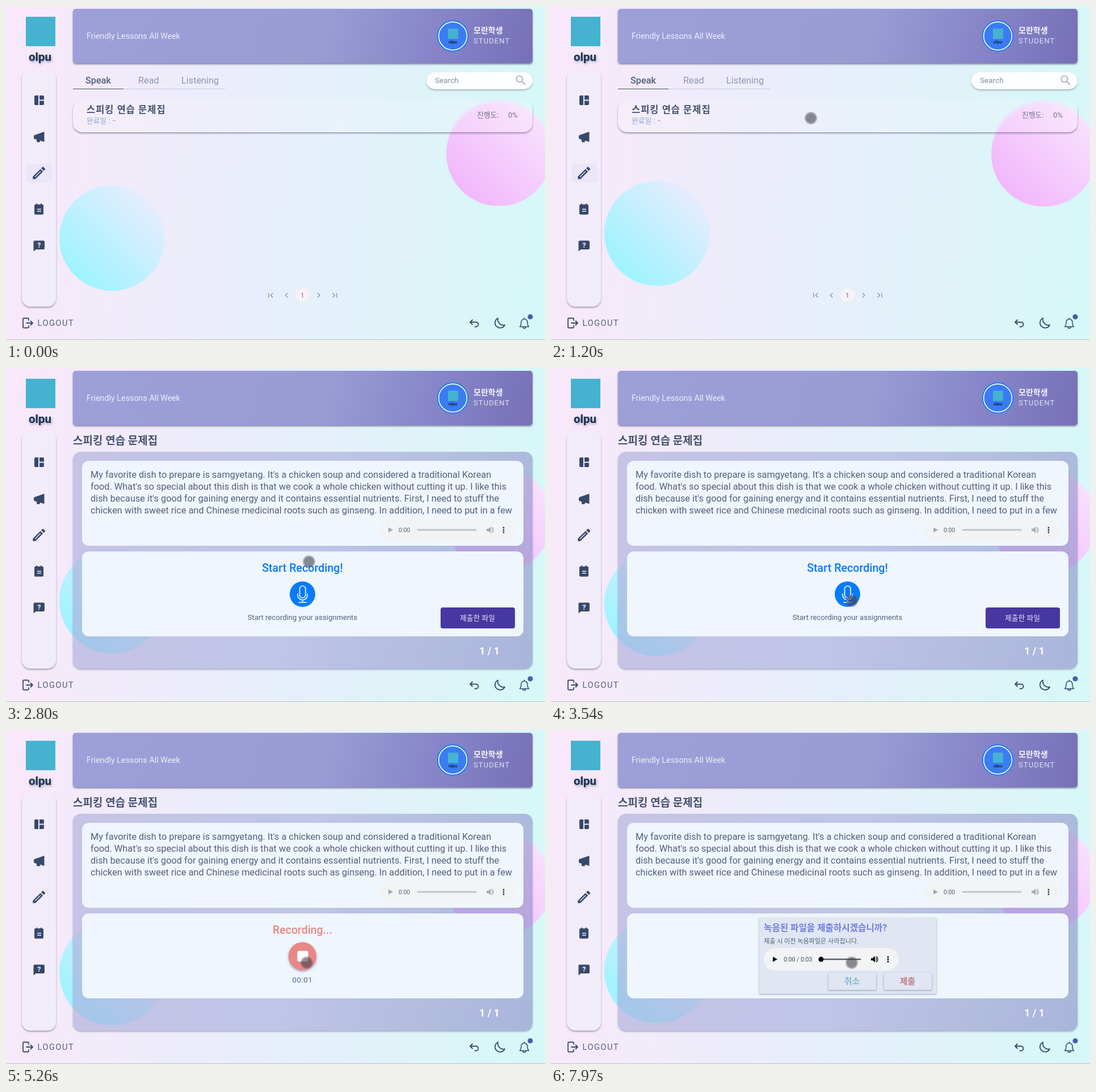
An HTML page for the animation above (8000 ms loop, 950 px wide and 590 px high).

```html
<!DOCTYPE html>
<html lang="ko">
<head>
<meta charset="utf-8">
<title>Speaking practice</title>
<style>
html, body { margin: 0; width: 100%; height: 100%; overflow: hidden; }
main {
  position: relative; width: 950px; height: 590px; overflow: hidden;
  background: linear-gradient(94deg, #f9e8fa 0%, #f1ebfa 22%, #e7effa 52%, #d6f8f8 100%);
  font-family: Roboto, "Noto Sans CJK KR", "Noto Sans CJK", sans-serif;
}
main::after { content: ""; position: absolute; left: 0; right: 0; bottom: 0; height: 1px; background: #bcbfcb; }
.layer, svg { position: absolute; inset: 0; width: 950px; height: 590px; }
.box { position: absolute; box-sizing: border-box; }

.blob { position: absolute; width: 186px; height: 186px; border-radius: 50%; top: -93px; }
.blue { left: 94px; background: linear-gradient(45deg, #9bf4ff 12%, #e9ecfe 88%); animation: blue 8s linear infinite; }
.pink { left: 776px; background: linear-gradient(45deg, #f1b6fb 12%, #f9e2fe 88%); animation: pink 8s linear infinite; }
@keyframes blue {
  0% { transform: translateY(410px); }
  16.8% { transform: translateY(400.3px); }
  79.6% { transform: translateY(436.5px); }
  100% { transform: translateY(425px); }
}
@keyframes pink {
  0%, 100% { transform: translateY(260.5px); }
  6.25% { transform: translateY(258.5px); }
  56.25% { transform: translateY(275px); }
}

.head { background: linear-gradient(105deg, #9c9fd8 0%, #9a9bd4 55%, #8785c8 78%, #7770b7 100%); border-radius: 5px; box-shadow: 0 2px 3px rgba(60, 60, 95, .6); }
.side { background: rgba(240, 238, 251, .6); border-radius: 15px; box-shadow: 0 2px 3px rgba(80, 80, 105, .5); clip-path: inset(3px -5px -8px -5px); }
.search { background: #fdfeff; border-radius: 15px; box-shadow: 0 2px 3px rgba(80, 90, 120, .4); }
.card { background: rgba(255, 255, 255, .15); backdrop-filter: blur(3px); border-radius: 16px; box-shadow: 0 2px 3px rgba(80, 80, 105, .55); clip-path: inset(0 -5px -8px -5px); }
.hot { background: rgba(232, 224, 246, .6); border-radius: 5px; }
.panel { background: linear-gradient(105deg, rgba(167, 169, 217, .6) 10%, rgba(164, 169, 218, .6) 50%, rgba(137, 138, 197, .6)); border-radius: 14px; box-shadow: 0 2px 3px rgba(80, 80, 120, .42); }
.paper { background: #eff6fe; border-radius: 12px; }
.pill { background: #f1f3f4; border-radius: 20px; }
.file { background: #4737a0; border-radius: 4px; }
.dialog { background: #e0e6f2; box-shadow: 0 1px 3px rgba(70, 80, 110, .5); }
.round { border-radius: 50%; background: #067bff; }
.stop { box-shadow: 0 2px 4px rgba(60, 60, 90, .5); animation: redden 8s linear infinite; }
@keyframes redden {
  0%, 51.2% { background: #0768e0; }
  54.4%, 100% { background: #e78886; }
}

.list, .work, .idle, .rec, .ask { animation: 8s step-end infinite; }
.list { animation-name: list; }
.work { animation-name: work; }
.idle { animation-name: idle; }
.rec { animation-name: rec; }
.ask { animation-name: ask; }
@keyframes list { 0% { visibility: visible; } 20%, 100% { visibility: hidden; } }
@keyframes work { 0% { visibility: hidden; } 20%, 100% { visibility: visible; } }
@keyframes idle { 0% { visibility: hidden; } 20% { visibility: visible; } 50%, 100% { visibility: hidden; } }
@keyframes rec { 0% { visibility: hidden; } 50% { visibility: visible; } 91%, 100% { visibility: hidden; } }
@keyframes ask { 0% { visibility: hidden; } 91%, 100% { visibility: visible; } }

.timer { position: absolute; left: 482px; top: 432px; width: 81px; height: 18px; overflow: hidden; text-align: center; font-size: 13.6px; line-height: 18px; letter-spacing: .4px; color: #5a6898; }
.timer div { animation: tick 8s step-end infinite; }
@keyframes tick {
  0% { transform: none; }
  62.5% { transform: translateY(-18px); }
  75% { transform: translateY(-36px); }
  87.5%, 100% { transform: translateY(-54px); }
}

.cursor {
  position: absolute; left: -11px; top: -11px; width: 22px; height: 22px; box-sizing: border-box; border-radius: 50%;
  background: rgba(66, 66, 74, .6) padding-box; border: 2px solid rgba(95, 75, 110, .4);
  animation: cursor 8s ease-in-out infinite;
}
@keyframes cursor {
  0%, 3.5% { transform: translate(860px, 612px); animation-timing-function: linear; }
  7% { transform: translate(590px, 330px); animation-timing-function: ease-out; }
  11%, 19% { transform: translate(458px, 198px); }
  21%, 29% { transform: translate(460px, 202px); }
  34.5%, 37.5% { transform: translate(534px, 342px); }
  41%, 100% { transform: translate(530px, 411px); }
}

text { white-space: pre; fill: #53607c; }
.strong { font-weight: 700; fill: #435170; }
.mid { text-anchor: middle; }
.ink { fill: #37496b; }
.line { fill: none; stroke: #37496b; stroke-width: 1.8; stroke-linecap: round; stroke-linejoin: round; }
.soft { stroke: #8790a8; stroke-width: 1.3; }
</style>
</head>
<body>
<main>
  <i class="blob blue"></i>
  <i class="blob pink"></i>
  <div class="box head" style="left:118px;top:5px;width:810px;height:96px"></div>
  <div class="box side" style="left:28px;top:112px;width:60px;height:419px"></div>

  <div class="layer list">
    <div class="box hot" style="left:36px;top:278px;width:46px;height:34px"></div>
    <div class="box search" style="left:741px;top:117px;width:187px;height:30px"></div>
    <div class="box card" style="left:118px;top:166px;width:810px;height:57px"></div>
    <svg>
      <g font-size="16.3">
        <text x="140" y="136.5" font-weight="500">Speak</text>
        <text x="233" y="136.5" style="fill:#9097b0">Read</text>
        <text x="309" y="136.5" style="fill:#9097b0">Listening</text>
      </g>
      <path d="M207 146.5H386" stroke="#c3c8dc"/>
      <path d="M118 146.5H207" stroke="#46536f"/>
      <text x="756" y="136" font-size="13.6" style="fill:#858ca3">Search</text>
      <g fill="none" stroke="#b2b2bf" stroke-width="2"><circle cx="905" cy="129" r="5.5"/><path d="M909 133l6 6"/></g>
      <text class="strong" x="142" y="189" font-size="16.5" letter-spacing="1">스피킹 연습 문제집</text>
      <text x="142" y="207" font-size="12.8" style="fill:#94a5c8">완료일 : −</text>
      <text x="830" y="197" font-size="12.8" style="fill:#6f7690">진행도:</text>
      <text x="885" y="197" font-size="13" style="fill:#6f7690">0%</text>
      <circle cx="523" cy="511" r="12" fill="#f8f1f8"/>
      <text class="mid" x="522.5" y="514.5" font-size="10.5">1</text>
      <path class="line soft" d="M463 507.5v7M470 507.5l-3.5 3.5 3.5 3.5M496 507.5l-3.5 3.5 3.5 3.5M549.5 507.5l3.5 3.5-3.5 3.5M576 507.5l3.5 3.5-3.5 3.5M583 507.5v7"/>
    </svg>
  </div>

  <div class="layer work">
    <div class="box panel" style="left:118px;top:148px;width:810px;height:383px"></div>
    <div class="box paper" style="left:134px;top:164px;width:778px;height:150px"></div>
    <div class="box paper" style="left:134px;top:324px;width:778px;height:150px"></div>
    <div class="box pill" style="left:658px;top:267px;width:238px;height:38px"></div>
    <svg>
      <text class="strong" x="118" y="135" font-size="19">스피킹 연습 문제집</text>
      <g font-size="16.33">
        <text x="149" y="194">My favorite dish to prepare is samgyetang. It's a chicken soup and considered a traditional Korean</text>
        <text x="149" y="215">food. What's so special about this dish is that we cook a whole chicken without cutting it up. I like this</text>
        <text x="149" y="236">dish because it's good for gaining energy and it contains essential nutrients. First, I need to stuff the</text>
        <text x="149" y="257">chicken with sweet rice and Chinese medicinal roots such as ginseng. In addition, I need to put in a few</text>
      </g>
      <path d="M674 281.5l8 4.5-8 4.5z" fill="#a5a8b0"/>
      <text x="692" y="290" font-size="10.5">0:00</text>
      <path d="M726 286H828" stroke="#c1c4cb" stroke-width="3" stroke-linecap="round"/>
      <g transform="translate(853 286)" fill="#a5a8b0" color="#a5a8b0"><use href="#speaker"/></g>
      <g transform="translate(877 286)" fill="#30345a"><use href="#dots"/></g>
      <text class="mid" x="852" y="506" font-size="17.7" font-weight="700" style="fill:#fff">1 / 1</text>
    </svg>
  </div>

  <div class="layer idle">
    <div class="box round" style="left:500px;top:376.5px;width:45px;height:45px"></div>
    <div class="box file" style="left:765.5px;top:423px;width:131.5px;height:36.5px"></div>
    <svg>
      <text class="mid" x="522.5" y="360" font-size="19.7" font-weight="500" style="fill:#067bff">Start Recording!</text>
      <g fill="none" stroke="#fff" stroke-width="1.6" stroke-linecap="round">
        <rect x="517.5" y="385" width="10.5" height="21" rx="5.2"/>
        <path d="M514 399v2a8.7 8.7 0 0 0 17.4 0v-2M522.7 409.7v4.300M516 414h13.500"/>
      </g>
      <text class="mid" x="522.5" y="445" font-size="13.1">Start recording your assignments</text>
      <text class="mid" x="831" y="445.5" font-size="12.8" font-weight="500" style="fill:#e6e2f8">제출한 파일</text>
    </svg>
  </div>

  <div class="layer rec">
    <div class="box round stop" style="left:498px;top:374.5px;width:49px;height:49px"></div>
    <svg>
      <text class="mid" x="522.5" y="360" font-size="19.5" font-weight="500" style="fill:#e98784">Recording...</text>
      <rect x="513.5" y="390" width="19" height="19" rx="3" fill="#fff"/>
    </svg>
    <div class="timer"><div>00:00<br>00:01<br>00:02<br>00:03</div></div>
  </div>

  <div class="layer ask">
    <div class="box dialog" style="left:367px;top:332px;width:312px;height:134px"></div>
    <div class="box pill" style="left:375px;top:385px;width:238px;height:40px"></div>
    <div class="box dialog" style="left:489px;top:429px;width:84px;height:30px"></div>
    <div class="box dialog" style="left:587px;top:429px;width:84px;height:30px"></div>
    <svg>
      <text x="375" y="354.5" font-size="15.65" font-weight="700" style="fill:#6f7de2">녹음된 파일을 제출하시겠습니까?</text>
      <text x="375" y="377" font-size="11.1">제출 시 이전 녹음파일은 사라집니다.</text>
      <path d="M391 400.5l8 4.5-8 4.5z"/>
      <text x="410" y="409" font-size="10.6" style="fill:#4a4d55">0:00 / 0:03</text>
      <path d="M476 405h69" stroke="#5c5e63" stroke-width="2.6" stroke-linecap="round"/>
      <circle cx="476" cy="405" r="4.5"/>
      <g transform="translate(570 405)"><use href="#speaker"/></g>
      <g transform="translate(594 405)"><use href="#dots"/></g>
      <text class="mid" x="530.5" y="448.5" font-size="14.7" font-weight="700" style="fill:#82bbd1">취소</text>
      <text class="mid" x="628.5" y="448.5" font-size="14.7" font-weight="700" style="fill:#c07c80">제출</text>
    </svg>
  </div>

  <svg>
    <defs>
      <g id="speaker">
        <path d="M-6-2h3l4-3.5v11l-4-3.5h-3z"/>
        <path d="M2.5-2.5a3 3 0 0 1 0 5M2.5-5a5.3 5.3 0 0 1 0 10" fill="none" stroke="currentColor" stroke-width="1.2"/>
      </g>
      <g id="dots"><circle cy="-4" r="1.5"/><circle r="1.5"/><circle cy="4" r="1.5"/></g>
    </defs>

    <rect x="35" y="19" width="52" height="52" fill="#45b2d0"/>
    <text class="mid" x="60" y="97" font-size="20.5" font-weight="700" style="fill:#15304f;filter:drop-shadow(1px 2px 2px rgba(20,40,70,.4))">olpu</text>

    <text x="142" y="57.5" font-size="14.3" style="fill:#eeeefa">Friendly Lessons All Week</text>
    <circle cx="787.5" cy="53" r="25" fill="#3a7cf4" stroke="#fff" stroke-width="1.8"/>
    <circle cx="787.5" cy="53" r="26.7" fill="none" stroke="#1c80f6" stroke-width="2"/>
    <rect x="779" y="40" width="18" height="18" fill="#45b2d0"/>
    <text class="mid" x="787.5" y="66" font-size="8" font-weight="700" style="fill:#152742">olpu</text>
    <text x="824" y="48" font-size="14" font-weight="700" style="fill:#f6f6fd">모란학생</text>
    <text x="824" y="66" font-size="13" letter-spacing="1.1" style="fill:#dfdff3">STUDENT</text>

    <g class="ink">
      <path d="M50 160q0-2 2-2h5v17h-5q-2 0-2-2zM59 158h6q2 0 2 2v5.5h-8zM59 167.500h8v5.500q0 2-2 2h-6z"/>
      <path d="M67.500 222v18l-7.500-2.200v1.200q0 1.500-1.500 1.500h-3q-1.500 0-1.500-1.500v-3l-3.500-1q-1.500-.5-1.500-2v-3q0-1.500 1.500-2z"/>
      <path transform="translate(43.7 280.4) scale(1.21)" d="M3 17.250V21h3.750L17.810 9.940l-3.750-3.750zM20.710 7.040a1 1 0 0 0 0-1.410l-2.340-2.340a1 1 0 0 0-1.410 0l-1.830 1.830 3.750 3.750z"/>
      <path d="M52 350.5h1v-1.500h2v1.500h6v-1.500h2v1.500h1q2 0 2 2v14q0 2-2 2h-12q-2 0-2-2v-14q0-2 2-2z"/>
      <path d="M50.5 414.500h15.500q2 0 2 2v11.500q0 2-2 2h-13.500l-4 3.500v-17q0-2 2-2z"/>
    </g>
    <path d="M51 302l10-10" stroke="#f1eefa" stroke-width="1.3"/>
    <path d="M55 359h7M55 362.500h7" stroke="#f1eefa" stroke-width="1.3"/>
    <text class="mid" x="58.3" y="427" font-size="12.5" font-weight="700" style="fill:#f5f1fb">?</text>

    <path class="line" d="M40 555v-2q0-1.500-1.500-1.500h-7q-1.500 0-1.500 1.500v14q0 1.500 1.500 1.500h7q1.500 0 1.500-1.500v-2M36 560h11M43.500 556.500l3.500 3.500-3.500 3.500"/>
    <text x="55.5" y="565" font-size="14.6" letter-spacing="1.5">LOGOUT</text>
    <path class="line" d="M822 554.5l-4 4 4 4M818.500 558.500h10a4 4 0 0 1 0 8h-2"/>
    <path class="line" d="M867 551.5a9 9 0 1 0 12 12a10 10 0 0 1-12-12z"/>
    <path class="line" style="stroke-width:1.5" d="M905.5 566.500q2.500-2.500 2.500-8a5.500 5.500 0 0 1 11 0q0 5.500 2.500 8zM913.500 551v1.500M911 567a2.500 2.500 0 0 0 5 0"/>
    <circle cx="924" cy="549" r="4.6" fill="#4261ad"/>
  </svg>
  <div class="cursor"></div>
</main>
</body>
</html>
```
